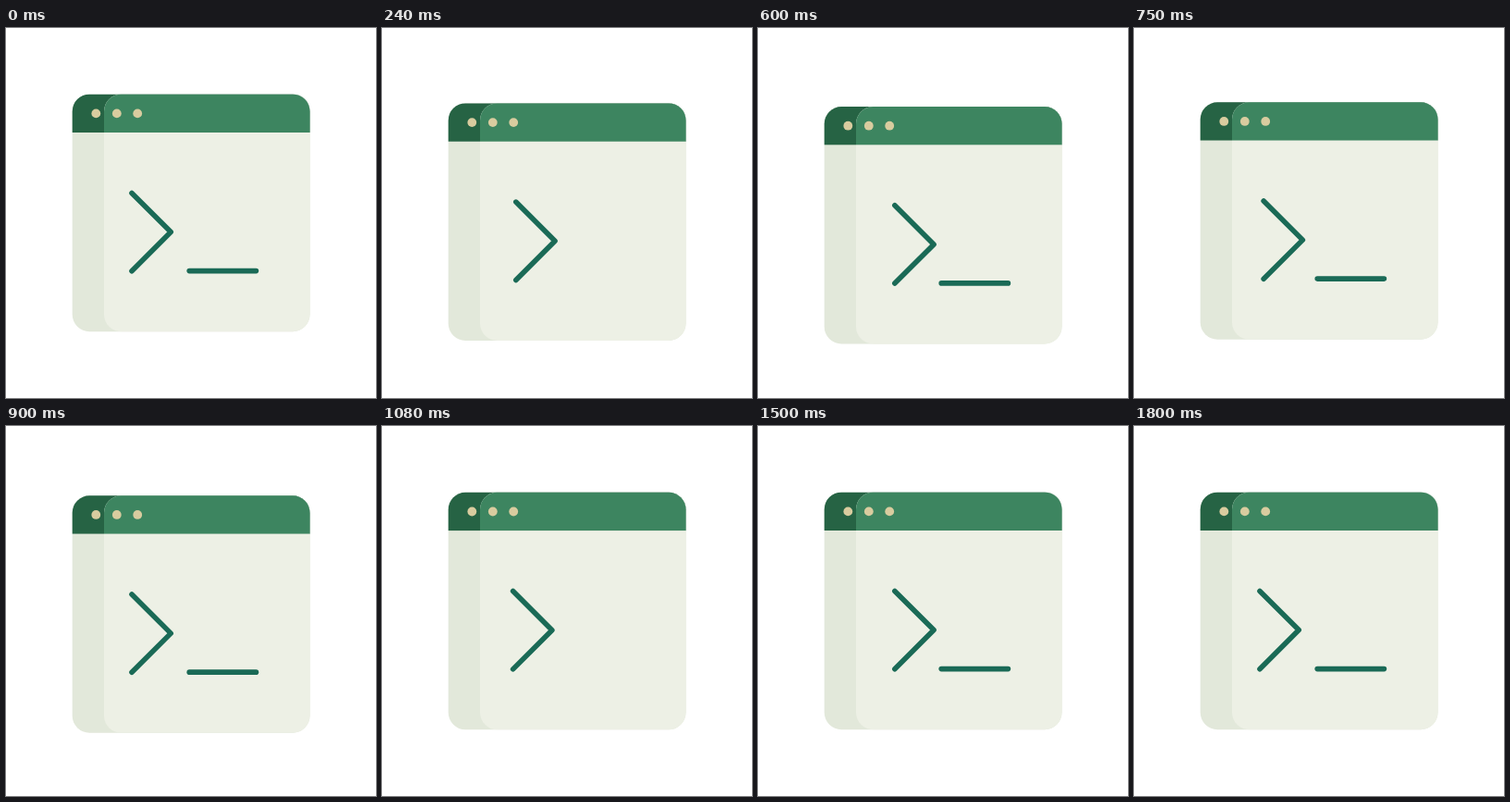
Recreate the animation shown at these times as an HTML page. Size 400 by 400 pixels, loop 3830 ms.

```html
<!DOCTYPE html>
<html lang="en">
<head>
<meta charset="utf-8">
<title>Terminal</title>
<style>
  html, body { margin: 0; width: 100%; height: 100%; overflow: hidden; background: #fff; }
  svg { display: block; width: 100%; height: 100%; }
  .line { fill: none; stroke: #1a6a56; stroke-width: 5.6; stroke-linecap: round; stroke-linejoin: round; }
</style>
</head>
<body>
<svg viewBox="0 0 400 400">
  <defs>
    <clipPath id="frame"><rect x="71.7" y="71.7" width="256.8" height="256.5" rx="18.5"/></clipPath>
    <clipPath id="front"><rect x="106" y="71.7" width="222.5" height="256.5" rx="18.5"/></clipPath>
  </defs>
  <g id="window">
    <g clip-path="url(#frame)">
      <rect x="71" y="71" width="258" height="258" fill="#e2e8da"/>
      <rect x="71" y="71" width="258" height="42" fill="#266344"/>
    </g>
    <g clip-path="url(#front)">
      <rect x="71" y="71" width="258" height="258" fill="#edf0e5"/>
      <rect x="71" y="71" width="258" height="42" fill="#3d8560"/>
    </g>
    <g fill="#d9cc9f">
      <circle cx="97.3" cy="92.4" r="4.9"/>
      <circle cx="119.8" cy="92.4" r="4.9"/>
      <circle cx="142.2" cy="92.4" r="4.9"/>
    </g>
    <path id="prompt" class="line" d="M136 178.4 178.2 220.6 136 262.8"/>
    <path id="cursor" class="line" d="M198.2 262.6H270.4"/>
  </g>
</svg>
<script>
  const LOOP = 3830, STEP = 30, ACTIVE = 1800, NUDGE = 900, SHIFT = 16;
  const [windowEl, prompt, cursor] =
    ['window', 'prompt', 'cursor'].map(id => document.getElementById(id));

  const ease = u => {
    u = Math.min(1, Math.max(0, u));
    return u * u * (3 - 2 * u);
  };

  // Rises to SHIFT at peak, then settles back to zero at end.
  const swing = (t, peak, end) =>
    SHIFT * (t < peak ? ease(t / peak) : 1 - ease((t - peak) / (end - peak)));

  function draw(now) {
    const t = Math.min(ACTIVE, Math.floor((now % LOOP) / STEP) * STEP);
    const phase = t % NUDGE;
    const cursorHidden = phase >= 150 && phase < 360;

    windowEl.setAttribute('transform', `translate(0 ${swing(t, 420, 1110)})`);
    prompt.setAttribute('transform', `translate(${swing(phase, NUDGE / 2, NUDGE)} 0)`);
    cursor.setAttribute('visibility', cursorHidden ? 'hidden' : 'visible');
  }

  const start = performance.now();
  function tick() {
    draw(performance.now() - start);
    requestAnimationFrame(tick);
  }
  tick();
</script>
</body>
</html>
```
